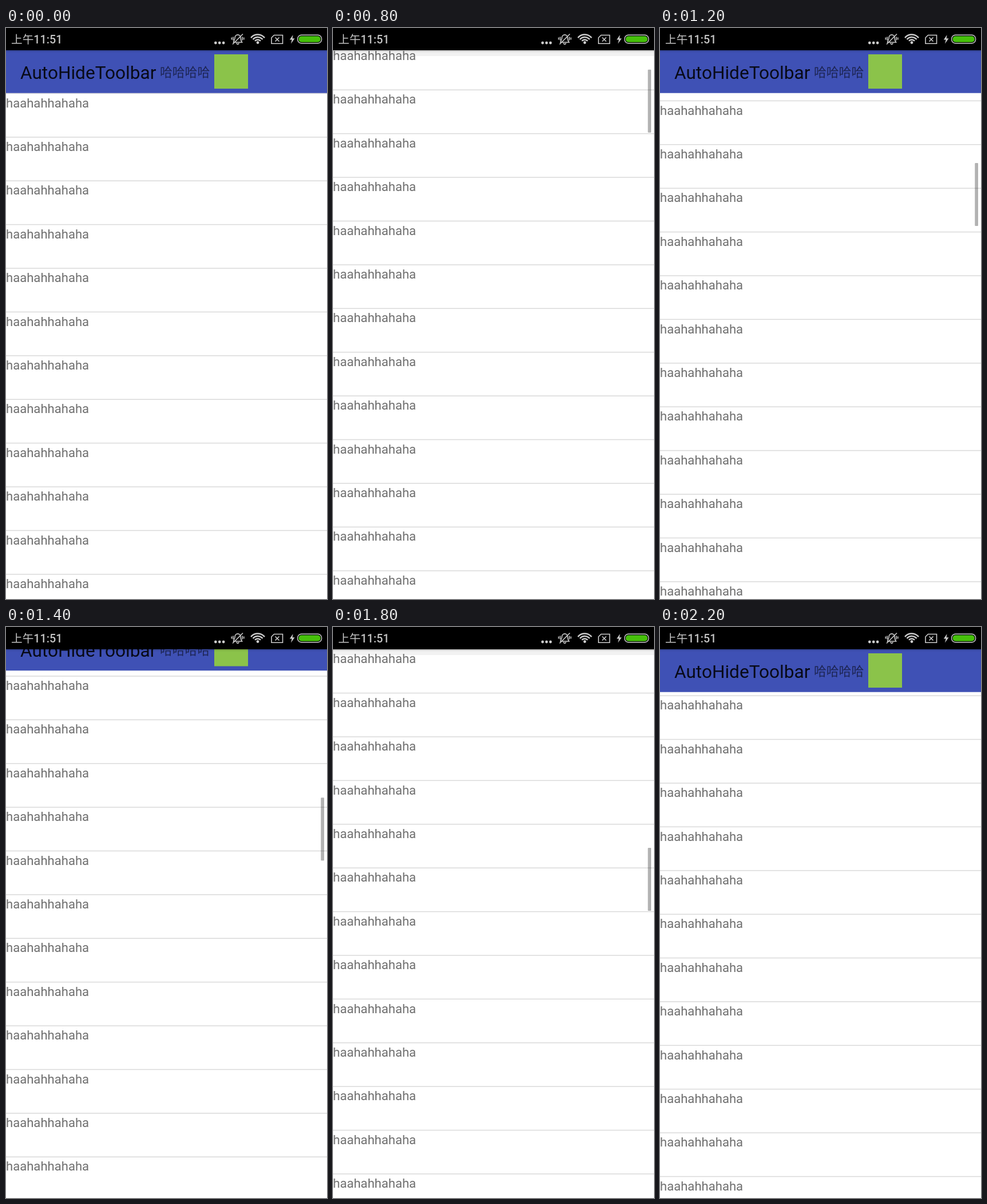
These frames come from a looping animation (561 by 998 pixels, 2400 ms). An HTML page with a canvas:

```html
<!DOCTYPE html>
<html lang="zh">
<head>
<meta charset="utf-8">
<title>AutoHideToolbar</title>
<style>
  html, body { margin: 0; width: 100%; height: 100%; overflow: hidden; background: #fff; }
  canvas { display: block; width: 561px; height: 998px; }
</style>
</head>
<body>
<canvas id="stage" width="561" height="998"></canvas>
<script>
const ctx = document.getElementById('stage').getContext('2d');
const W = 561, H = 998, LOOP = 2400, STEP = 100;
const STATUS_H = 39, BAR_H = 75, ROW = 76.4, LIST_TOP = 113.6;
const THUMB_H = 110, THUMB_RATE = 0.1082, THUMB_ALPHA = 0.3;
const ICON = '#cccccc';
const CJK = '"Noto Sans CJK SC", "Noto Sans CJK", sans-serif';

// Waypoints of the finger scroll: time in ms, offset in rows
const SCROLL = [[500, 0], [800, 4.08], [1200, 23.83], [1500, 35.145], [1700, 35.145], [1800, 41.985], [2200, 47.925]];

const clamp = v => Math.min(1, Math.max(0, v));
const ramp = (t, from, to) => clamp((t - from) / (to - from));
// Rises from 0 to 1 after `from` and is back at 0 by `to`
const pulse = (t, from, to, fade) => clamp(Math.min(t - from, to - t) / fade);

function scrollAt(t) {
  let rows = 0;
  for (let i = 1; i < SCROLL.length; i++) {
    const [t0, r0] = SCROLL[i - 1], [t1, r1] = SCROLL[i];
    rows += (r1 - r0) * ramp(t, t0, t1);
  }
  return rows * ROW;
}

const hiddenAt = t => pulse(t, 600, 1200, 200) + pulse(t, 1300, 2100, 200);
const thumbAlphaAt = t =>
  THUMB_ALPHA * (t < 1700 ? ramp(t, 500, 600) * ramp(t, 1700, 1430) : ramp(t, 2200, 2000));

function rect(x, y, w, h, color) {
  ctx.fillStyle = color;
  ctx.fillRect(x, y, w, h);
}

function text(str, x, y, font, color) {
  ctx.font = font;
  ctx.fillStyle = color;
  ctx.fillText(str, x, y);
}

function pill(x, y, w, h, r) {
  ctx.beginPath();
  ctx.roundRect(x, y, w, h, r);
}

function dot(x, y, r) {
  ctx.beginPath();
  ctx.arc(x, y, r, 0, 2 * Math.PI);
  ctx.fill();
}

function stroke(path) {
  ctx.stroke(new Path2D(path));
}

function drawList(scroll) {
  const first = Math.max(0, Math.floor(scroll / ROW) - 2);
  for (let i = first; i < first + 16; i++) {
    const y = LIST_TOP + i * ROW - scroll;
    rect(0, y, W, 1.5, '#dadada');
    text('haahahhahaha', 0, y + 25, '22.1px Roboto, sans-serif', '#707070');
  }
}

function drawThumb(scroll, alpha) {
  ctx.fillStyle = `rgba(0,0,0,${alpha})`;
  pill(550.3, STATUS_H + scroll * THUMB_RATE, 5.7, THUMB_H, 1);
  ctx.fill();
}

function drawToolbar(hidden) {
  if (hidden < 1) {
    ctx.save();
    ctx.translate(0, -hidden * BAR_H);
    rect(0, STATUS_H, W, BAR_H - .3, '#3f51b5');
    text('AutoHideToolbar', 25, 89, '31.6px Roboto, sans-serif', '#080a17');
    text('哈哈哈哈', 269, 85, `21.8px ${CJK}`, '#1d2553');
    rect(364, 46, 59, 60, '#8bc34a');
    ctx.restore();
  } else {
    rect(0, STATUS_H, W, 10, 'rgba(0,0,0,.05)');
  }
  rect(0, STATUS_H, W, 3, 'rgba(0,0,0,.09)');
}

function drawBell(x, y) {
  ctx.save();
  ctx.translate(x, y);
  ctx.lineWidth = 1.6;
  stroke('M-7.5 5.5Q-5-1-5-2C-5-9.5 5-9.5 5-2Q5 2 7.5 5.5Z M-2.3 6.8Q0 11 2.3 6.8 M9-9L-9 9');
  for (const side of [-1, 1]) {
    stroke(`M${8 * side}-4v6 M${10.7 * side}-3v4`);
  }
  ctx.restore();
}

function drawWifi(x, y) {
  ctx.lineWidth = 2.4;
  for (let ring = 0; ring < 3; ring++) {
    ctx.beginPath();
    ctx.arc(x, y, 6.5 + ring * 4.5, -Math.PI * .78, -Math.PI * .22);
    ctx.stroke();
  }
  dot(x, y - 1.5, 2.4);
}

function drawBattery() {
  ctx.fill(new Path2D('M501.5 12L495.8 20.5H499.6L498 27.5L504.5 18.2H500.6Z'));
  ctx.lineWidth = 1.4;
  pill(509.6, 12.3, 42, 14.4, 6.5);
  ctx.stroke();
  ctx.fillStyle = '#46c00a';
  pill(511.5, 14.2, 38.2, 10.6, 5);
  ctx.fill();
}

function drawStatusBar() {
  rect(0, 0, W, STATUS_H, '#000');
  text('上午11:51', 9, 26.8, `500 19.7px Roboto, ${CJK}`, '#c4c4c4');
  ctx.fillStyle = ctx.strokeStyle = ICON;
  for (let i = 0; i < 3; i++) dot(366.3 + i * 6.9, 26, 2.4);
  drawBell(405, 19.5);
  drawWifi(440, 27);
  ctx.lineWidth = 1.6;
  stroke('M468.5 12.5H483.5V27.3H464V17Z M470.5 16.5l7 7 M477.5 16.5l-7 7');
  drawBattery();
}

function draw(t) {
  const scroll = scrollAt(t);
  rect(0, 0, W, H, '#fff');
  drawList(scroll);
  drawThumb(scroll, thumbAlphaAt(t));
  drawToolbar(hiddenAt(t));
  drawStatusBar();
}

const start = performance.now();
function tick() {
  const elapsed = (performance.now() - start) % LOOP;
  draw(Math.floor(elapsed / STEP) * STEP);
  requestAnimationFrame(tick);
}
tick();
</script>
</body>
</html>
```
